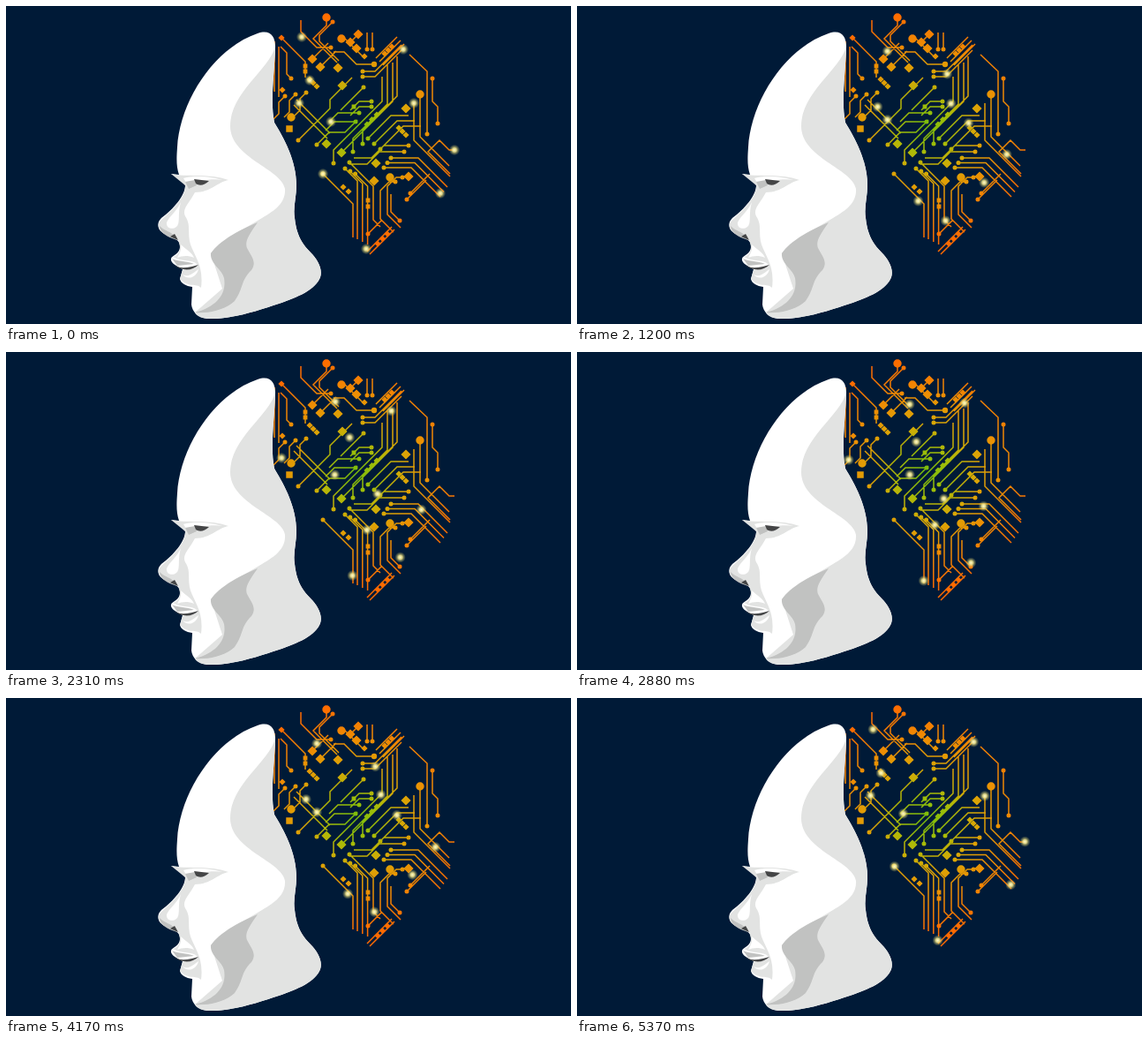
Write an HTML page that moves like this. It is 640 px wide and 360 px high and loops after 5.4 s.

```html
<!DOCTYPE html>
<html lang="en">
<head>
<meta charset="utf-8">
<title>Circuit mind</title>
<style>
  html, body { margin: 0; width: 100%; height: 100%; overflow: hidden; background: #001a37; }
  svg { display: block; width: 640px; height: 360px; }
  #wires { fill: none; stroke: url(#heat); stroke-width: 1.5; }
  #chips { fill: url(#heat); }
</style>
</head>
<body>
<svg viewBox="0 0 640 360">
  <defs>
    <radialGradient id="heat" gradientUnits="userSpaceOnUse" cx="394" cy="136" r="132">
      <stop offset="0" stop-color="#78bd0c"/>
      <stop offset=".2" stop-color="#a2bd08"/>
      <stop offset=".42" stop-color="#d8a806"/>
      <stop offset=".65" stop-color="#ec9004"/>
      <stop offset="1" stop-color="#ff6a00"/>
    </radialGradient>
    <radialGradient id="shine">
      <stop offset="0" stop-color="#fffbd0"/>
      <stop offset=".35" stop-color="#f5ea90" stop-opacity=".9"/>
      <stop offset=".65" stop-color="#d8cc70" stop-opacity=".45"/>
      <stop offset="1" stop-color="#c8bc60" stop-opacity="0"/>
    </radialGradient>
  </defs>
  <path id="wires"/>
  <path id="chips"/>

  <!-- head: light, shade, deep shade -->
  <path fill="#fff" d="M285 31C299 26 305 34 305 46C304 78 299 108 304 132C315 150 329 175 329 203C329 216 325 228 327 240C329 258 334 268 345 279C353 287 359 298 356 307C351 321 330 330 309 337C285 345 255 355 228 354C217 353 211 346 210 338L211 318C204 317 198 314 197 309L200 298C193 294 186 291 187 286C188 282 198 281 197 271C196 262 185 262 178 257C172 253 170 246 176 240C190 230 203 214 203 203L198 196L187 190L196 191C193 182 193 174 194 160C197 108 235 48 285 31Z"/>
  <path fill="#e2e3e2" d="M305 46C304 78 299 108 304 132C315 150 329 175 329 203C329 216 325 228 327 240C329 258 334 268 345 279C353 287 359 298 356 307C351 321 330 330 309 337C285 345 255 355 228 354C220 353 215 350 214 347L245 320L232 280C242 266 271 252 290 240C306 231 317 222 316 207C312 184 254 172 254 136C254 98 298 72 305 46Z"/>
  <path fill="#c1c2c1" d="M285 245C276 258 270 266 273 274C279 285 284 290 278 299C265 312 270 318 259 334C247 345 228 348 214 347C240 340 250 325 247 308C245 298 231 292 232 280C240 268 258 256 285 245Z"/>
  <!-- face -->
  <path fill="#e2e3e2" d="M187 190C203 194 230 189 252 197C240 199 232 211 214 211C207 224 199 230 203 238C210 248 205 257 209 270C214 284 224 294 221 319C215 313 208 320 197 309L200 299L217 293C211 286 199 290 189 284C198 282 199 272 194 263C184 261 170 256 173 246C181 236 204 220 203 203Z"/>
  <path fill="#fff" d="M201 195C216 191 235 194 245 197C234 195 215 198 206 203ZM198 222C194 232 185 238 182 245C181 251 188 254 193 250C198 246 194 235 198 222ZM198 270C204 276 211 279 213 285C206 282 199 283 194 285C197 279 199 276 198 270ZM200 304C207 308 212 302 218 298C216 307 206 311 200 304Z"/>
  <path fill="#c1c2c1" d="M174 249C180 256 190 255 194 265C184 262 175 258 174 249ZM188 286C196 290 204 288 213 292L194 294ZM203 199L214 197L216 203L207 207Z"/>
  <path fill="#444546" d="M213 196L230 198C225 203 219 204 215 201ZM189 292C197 299 207 296 218 293C211 300 199 301 189 292ZM191 258L195 265L186 261Z"/>
  <g id="glows"></g>
</svg>
<script>
const byId = id => document.getElementById(id);
let wires = "", chips = "";

// Repeat a part n times, each copy shifted by (dx, dy)
function repeat(n, dx, dy, part) {
  for (let i = 0; i < n; i++) part(i * dx, i * dy);
}
function dot(x, y, r = 2.5) {
  chips += `M${x - r} ${y}a${r} ${r} 0 1 1 ${2 * r} 0a${r} ${r} 0 1 1 ${-2 * r} 0z`;
}
function track(x, y, shape, n = 1, dx = 0, dy = 0) {
  repeat(n, dx, dy, (a, b) => wires += `M${x + a} ${y + b}${shape}`);
}
// A track, or a bundle of parallel ones, that starts at a round pad
function wire(x, y, shape, n = 1, dx = 0, dy = 0) {
  track(x, y, shape, n, dx, dy);
  repeat(n, dx, dy, (a, b) => dot(x + a, y + b));
}
function diamond(x, y, r = 5.6, n = 1, dx = 0, dy = 0) {
  repeat(n, dx, dy, (a, b) => chips += `M${x + a} ${y + b - r}l${r} ${r}l${-r} ${r}l${-r} ${-r}z`);
}
function square(x, y, s, n = 1, dy = 0) {
  repeat(n, 0, dy, (a, b) => chips += `M${x - s / 2} ${y + b - s / 2}h${s}v${s}h${-s}z`);
}

// Upper left
wire(368, 47, "h-16l-18 -18v-13");
wire(370, 18, "l-15 15v7l22 22");
track(363, 13, "v9l-15 15l27 27");
track(312, 36, "l27 27v18");
wire(323, 82, "l-5 -5v-24l-7 -7");
track(304, 40, "v57", 2, 5, 6);
wire(316, 102, "l-7 7v13l-6 6", 3, 12, -2);
track(347, 60, "l18 -18", 2, 9, 9);
track(390, 41, "l9 -9");
track(383, 36, "l22 22");
track(417, 66, "h-20l-14 -14h-12");
wire(409, 49, "v-19", 2, 6, 0);
// Upper right
wire(404, 74, "h14l30 -30", 2, 0, 6);
track(443, 35, "l-24 24", 3, 4, 4);
wire(477, 145, "v-71l-20 -19");
wire(483, 82, "v26l6 6v19");
dot(489, 133);
track(469, 100, "v48l33 33");
track(462, 110, "v42l41 41");
// Middle
wire(331, 152, "l36 -36v-10l25 -25");
track(329, 106, "l38 38", 2, -3, 6);
wire(352, 157, "l14 -14h18l14 -14");
wire(400, 121, "h-24l-10 10", 2, -4, 10);
wire(405, 92, "l-26 26");
wire(414, 108, "h-14l-10 10", 2, 0, 6);
wire(371, 178, "v-15l55 -55v-28");
wire(393, 165, "v-15l39 -39v-45", 2, 11, -9);
track(380, 166, "l58 -58v-44");
wire(410, 150, "l26 -26h20", 3, 7, 6);
// Lower right
wire(456, 158, "h-28l-14 14h-20", 2, -5, 7);
wire(436, 172, "h31l33 33", 3, -4, 5.5);
track(508, 163, "h-6l-11 -11l-13 13l25 25");
wire(458, 212, "l22 -22", 2, -4, 7);
wire(441, 199, "h-7l-10 10v32l15 15", 2, 8, -5);
wire(446, 243, "l-10 -10v-20");
// Lower left
wire(359, 190, "l34 34v38");
wire(384, 184, "l14 14v66", 3, 5.8, 3);
wire(389, 177, "l27 27v38l8 8");
wire(410, 258, "l16 -16");
track(409, 278, "l28 -28", 2, 3, 3);

dot(363, 13, 4.7);
dot(380, 37, 4.7);
dot(323, 126, 4.7);
dot(469, 100, 4.7);
dot(435, 194, 4.7);
dot(417, 66, 3.2);
diamond(347, 60, 5.6, 2, 9, 9);
diamond(376, 70);
diamond(381, 90);
diamond(390, 41, 5.6, 2, 9, -9);
diamond(397, 48);
diamond(453, 116);
diamond(363, 156, 5.6, 2, 17, 10);
diamond(419, 178);
diamond(417, 198);
diamond(456, 193);
diamond(312, 36, 3.6);
diamond(313, 95, 3.6);
diamond(406, 57, 3.6);
diamond(344, 83, 3.6, 3, 4, 4);
diamond(429, 54, 3.6, 3, 4, -4);
diamond(409, 134, 3.6, 3, 5.5, -5.5);
diamond(445, 138, 3.6, 3, 4, 4);
diamond(421, 269, 3.6, 3, 5.5, -5.5);
diamond(382, 205, 3.6, 2, 6, 5);
square(321, 139, 7.5);
square(339, 68, 4.8, 2, 6);
square(410, 220, 4.8, 2, 7);
square(394, 114, 4.8);
byId("wires").setAttribute("d", wires);
byId("chips").setAttribute("d", chips);

// Each light passes its key points at even times for half the loop, then returns
const LOOP = 5400;
const ROUTES = [
  "335,35 343,45 354,53 368,52 380,62",
  "450,49 434,66 415,80 396,90 380,106",
  "344,84 353,104 337,117 318,117 304,124",
  "332,110 343,121 354,131 366,139 381,139",
  "462,110 460,131 439,133 428,153 411,171",
  "368,131 405,130 429,105 433,79 441,50",
  "508,163 493,154 485,172 484,184 452,171",
  "359,190 374,206 390,225 392,245 393,264",
  "492,212 476,196 457,201 447,224 446,244",
  "408,275 423,261 416,238 414,209 402,191",
].map(route => route.split(" ").map(point => point.split(",").map(Number)));

const glows = ROUTES.map(() => {
  const glow = document.createElementNS("http://www.w3.org/2000/svg", "circle");
  glow.setAttribute("r", 6.2);
  glow.setAttribute("fill", "url(#shine)");
  return byId("glows").appendChild(glow);
});

function draw(time) {
  const t = time % LOOP / LOOP;
  const phase = 1 - Math.abs(1 - 2 * t);
  ROUTES.forEach((route, n) => {
    const legs = route.length - 1;
    const i = Math.min(legs - 1, Math.floor(phase * legs));
    const k = phase * legs - i;
    const [x, y] = route[i].map((from, axis) => from + (route[i + 1][axis] - from) * k);
    glows[n].setAttribute("transform", `translate(${x} ${y})`);
  });
}

const start = performance.now();
function tick() {
  draw(performance.now() - start);
  requestAnimationFrame(tick);
}
tick();
</script>
</body>
</html>
```
